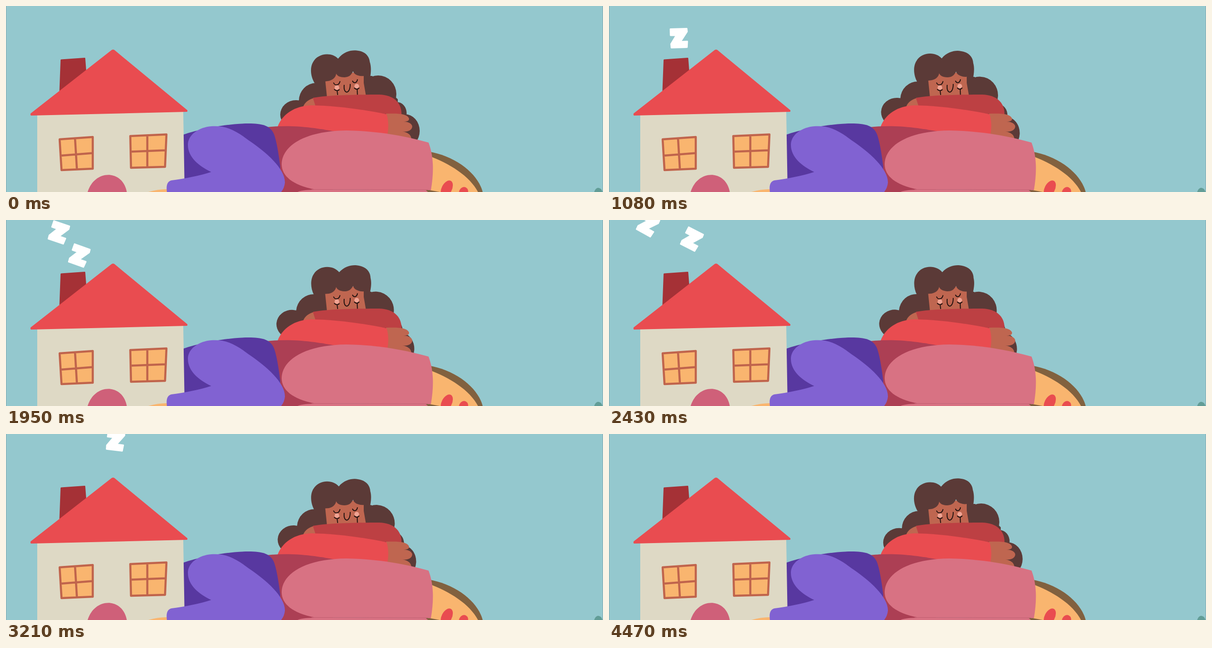
Recreate the animation shown at these times as an HTML page. Size 1280 by 399 pixels, loop 4500 ms.

```html
<!DOCTYPE html>
<html lang="en">
<head>
<meta charset="utf-8">
<title>Sleepy house</title>
<style>
html, body { margin: 0; height: 100%; overflow: hidden; background: #94c8ce; }
svg { display: block; width: 100%; height: 100%; }
.line { fill: none; stroke: #1d0f0e; stroke-width: 1.9; stroke-linecap: round; }
.hair { fill: #5b3a37; }
.skin { fill: #bf6650; }
.red { fill: #e94c50; }
.pink { fill: #d87283; }
.yellow { fill: #f9b56f; }
.window { stroke: #c0644c; stroke-width: 4.5; stroke-linejoin: round; }
</style>
</head>
<body>
<svg viewBox="0 0 1280 399">
  <defs>
    <path id="z" d="M-18-19.5L17-19.5L17.5-13L3 8L17.5 8L16.5 20.5L-17 20.5L-17.5 12.5L-5.5-6L-18-6Z"
      fill="#fff" stroke="#fff" stroke-width="3" stroke-linejoin="round"/>
  </defs>
  <path d="M0.5 0V399M1279.5 0V399" stroke="#83aab2"/>
  <path d="M1261 399Q1264 390 1270 390Q1277 391 1279 399Z" fill="#629d97"/>

  <use href="#z" id="z1"/>
  <use href="#z" id="z2"/>

  <!-- pizza -->
  <path d="M905 312C965 322 1012 360 1022 399H900Z" fill="#81613f"/>
  <path class="yellow" d="M905 321C952 338 994 365 1012 399H930L903 394Z"/>
  <g class="red">
    <ellipse cx="945" cy="392" rx="11" ry="19" transform="rotate(27 945 392)"/>
    <ellipse cx="981" cy="399" rx="9.500" ry="11" transform="rotate(27 981 399)"/>
  </g>

  <!-- sleeper -->
  <g id="curls" class="hair">
    <path d="M680 150H785L840 200V270H640V190Z"/>
    <ellipse cx="665" cy="203" rx="37" ry="38"/>
    <ellipse cx="622" cy="233" rx="34" ry="31"/>
    <ellipse cx="798" cy="189" rx="39" ry="40"/>
    <ellipse cx="838" cy="230" rx="21" ry="24"/>
    <ellipse cx="855" cy="268" rx="32" ry="36"/>
  </g>
  <path class="skin" d="M683 145L688 194H772L767 165V142Z"/>
  <path id="fringe" class="hair" d="M662 166C652 150 652 131 658 121C668 101 698 98 712 113C724 97 742 94 752 95.500C770 97 779 108 780 120C784 132 782 145 781 153L768 150Q760 151 755 149C748 147 746 144 744 140C739 150 735 152 726 153C716 153 710 150 708 145C707 154 699 160 690 161L683 162Z"/>
  <g fill="#f0a494">
    <circle cx="709.500" cy="175" r="5"/>
    <circle cx="752" cy="172" r="5"/>
  </g>
  <path class="line" d="M702.500 165C705 171 714 171 716 162M743 161C746 167 752 165 753.500 158M704 179Q710 184 714.500 179.500M710 182L711 190M747 176Q752 181 757 176M753 179L753.500 190M725 170C723 190 738 190 738 168"/>
  <path class="skin" d="M637 217C640 206 650 200 662 197L668 216Z"/>
  <path d="M658 197C690 191 750 190 800 190C830 191 848 206 848 232H820L664 216Z" fill="#bd4043"/>
  <path class="skin" d="M815 231C840 230 860 231 864 241C865 246 860 248 852 248C862 248 870 252 871 258C871 266 862 271 850 269C860 271 868 275 869 284H815Z"/>
  <path class="red" d="M582 260C590 236 615 214 655 213C710 214 765 222 816 232Q822 252 818 275L690 275Z"/>
  <path d="M558 260C605 255 650 258 720 272L700 399H570Z" fill="#ac3f54"/>
  <path class="pink" d="M591 339C592 300 640 268 730 267C800 268 860 280 906 293C918 325 917 360 911 395L660 393C615 384 591 365 591 339Z"/>
  <path class="pink" d="M625 399C640 392 670 393 900 395L905 399Z"/>
  <path d="M655 393.500L905 394.500" stroke="#c25f72"/>
  <path d="M380 276C420 262 480 252 520 252C553 252 568 258 575 276Q582 296 588 345V399H380Z" fill="#5838a0"/>

  <!-- house -->
  <path d="M67 234L380 226L383 399H67Z" fill="#ded9c5"/>
  <path d="M118.500 116L168.500 112.500L171 145L116 182Z" fill="#a53136" stroke="#a53136" stroke-width="3" stroke-linejoin="round"/>
  <path class="red" d="M54 231.500L227 96Q229.500 94 232 96L387.500 224.500V225.500L54 233.500Z" stroke="#e94c50" stroke-width="3" stroke-linejoin="round"/>
  <path d="M175 399C190 350 250 350 259 399Z" fill="#cf6079"/>
  <g class="yellow window">
    <path d="M115 286L186 281V349L119 352ZM148 284L152 350M117 321L186 315.500"/>
    <path d="M266.500 279L344 275.500L341 345L268 347ZM303 277.500V346M267 312.500L342 309.500"/>
  </g>

  <!-- front leg, over the house -->
  <path class="yellow" d="M305 399Q325 393 345 393V399Z"/>
  <path d="M440 258C470 256 490 265 520 288C560 315 599 350 598 379Q597 390 590 399H345C343 384 346 376 355 374C385 370 415 364 440 356C415 344 390 325 390 298C390 275 415 260 440 258Z" fill="#8162d2"/>
</svg>
<script>
const LOOP = 4500;
const byId = id => document.getElementById(id);

// Each key: time, x, y, angle
const letters = [
  ['z1', [[150, 146, 137, -14], [690, 153.5, 95, -10], [1470, 140, 46, 8], [2430, 84, 10, 29], [2550, 82, 7, 29]]],
  ['z2', [[1150, 138, 138, 4], [1470, 142, 115.5, 8], [2430, 178, 41, 27], [3210, 235, 14, 7], [3350, 245, 9, 4]]]
];

function slope(keys, i, k) {
  const a = keys[Math.max(i - 1, 0)], b = keys[Math.min(i + 1, keys.length - 1)];
  return (b[k] - a[k]) / (b[0] - a[0]);
}

// Smooth Hermite curve through the keys
function sample(keys, t, k) {
  const i = keys.findIndex(key => key[0] > t) - 1;
  const a = keys[i], b = keys[i + 1], d = b[0] - a[0], u = (t - a[0]) / d, v = 1 - u;
  return v * v * (1 + 2 * u) * a[k] + u * u * (1 + 2 * v) * b[k]
    + d * u * v * (v * slope(keys, i, k) - u * slope(keys, i + 1, k));
}

function draw() {
  const t = performance.now() % LOOP;
  for (const [id, keys] of letters) {
    const el = byId(id), shown = t >= keys[0][0] && t < keys.at(-1)[0];
    el.style.display = shown ? '' : 'none';
    if (shown) {
      const [x, y, angle] = [1, 2, 3].map(k => sample(keys, t, k));
      el.setAttribute('transform', `translate(${x} ${y}) rotate(${angle})`);
    }
  }
  const sway = 5.1 * (1 - Math.abs(2 * t / LOOP - 1));
  byId('curls').setAttribute('transform', `rotate(${sway} 736 122)`);
  byId('fringe').setAttribute('transform', `rotate(${sway} 725 143)`);
  requestAnimationFrame(draw);
}
draw();
</script>
</body>
</html>
```
